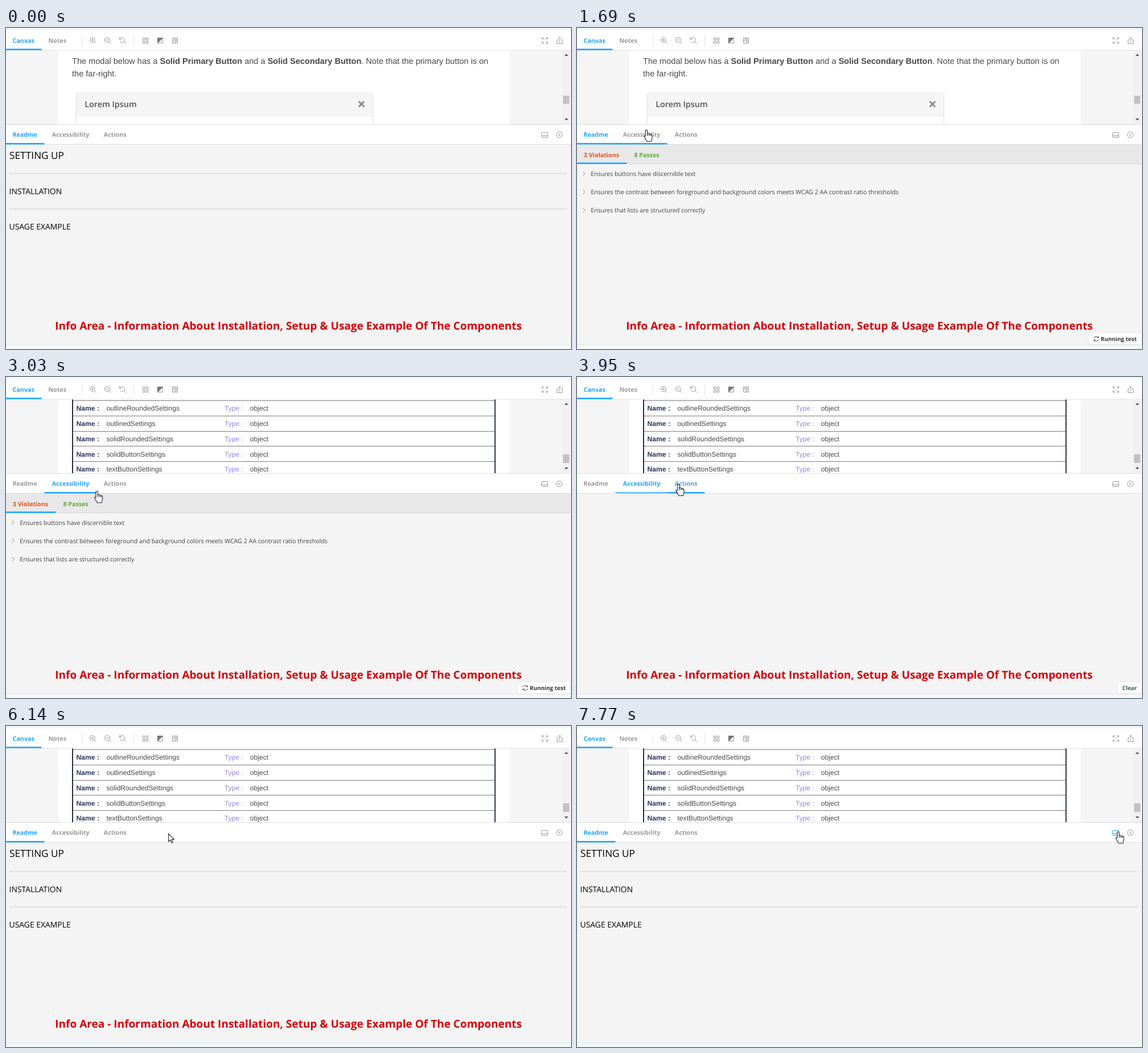
Recreate the animation shown at these times as an HTML page. Size 993x564 px, loop 8 s.

```html
<!DOCTYPE html>
<html lang="en">
<head>
<meta charset="utf-8">
<title>Component info area</title>
<style>
  html, body { margin: 0; width: 100%; height: 100%; overflow: hidden; background: #f6f9fc; }
  svg { display: block; width: 993px; height: 564px; }
  text { font-family: "Open Sans", "Noto Sans", sans-serif; text-rendering: geometricPrecision; }

  .tab { font-size: 10.7px; font-weight: 700; fill: #999; }
  .on { fill: #1ea7fd; }
  .icon { fill: none; stroke: #969696; }
  .action { font-size: 9.95px; font-weight: 700; fill: #333; }
  .doc text { font-family: "Liberation Sans", Arial, sans-serif; fill: #484848; }
  .prose { font-size: 14.56px; }
  .prose tspan { font-weight: 700; }
  .rows text { font-size: 12.1px; }
  .rows .name { font-weight: 700; fill: #2b3560; }
  .rows .type { fill: #9385df; }
  .rule { fill: #e5e5e5; }
  .head { font-size: 13.9px; font-weight: 500; fill: #000; }
  .check { font-size: 10.56px; fill: #404040; }
  .caption { font-size: 19.04px; font-weight: 700; fill: #d30408; }

  /* one 8 s clock for everything */
  .anim { animation: 8s linear infinite; }
  .cut { animation: 8s step-end infinite; }

  .readme { animation-name: readme; }
  .audit { animation-name: audit; }
  .log { animation-name: log; }
  .before { animation-name: before; }
  .after { animation-name: after; }
  .caption { animation-name: caption; }
  @keyframes readme { 0% { opacity: 1 } 19% { opacity: 0 } 68%, 100% { opacity: 1 } }
  @keyframes audit { 0% { opacity: 0 } 19% { opacity: 1 } 48.375%, 100% { opacity: 0 } }
  @keyframes log { 0% { opacity: 0 } 48.375% { opacity: 1 } 68%, 100% { opacity: 0 } }
  @keyframes before { 0% { opacity: 1 } 22.875%, 100% { opacity: 0 } }
  @keyframes after { 0% { opacity: 0 } 22.875%, 100% { opacity: 1 } }
  @keyframes caption { 0% { opacity: 1 } 89.375%, 100% { opacity: 0 } }

  .t1 { animation-name: t1; }
  .t2 { animation-name: t2; }
  .t3 { animation-name: t3; }
  @keyframes t1 { 0%, 31.875% { fill: #1ea7fd } 33.75%, 68% { fill: #999 } 70%, 100% { fill: #1ea7fd } }
  @keyframes t2 { 0%, 31.875% { fill: #999 } 33.75%, 49.5% { fill: #1ea7fd } 51.5%, 100% { fill: #999 } }
  @keyframes t3 { 0%, 48.375% { fill: #999 } 50.375%, 68% { fill: #1ea7fd } 70%, 100% { fill: #999 } }

  .u1 { animation-name: u1; }
  .u2 { animation-name: u2; }
  .u3 { animation-name: u3; }
  @keyframes u1 { 0%, 31.875% { opacity: 1 } 33.75%, 65.8% { opacity: 0 } 65.9%, 68% { opacity: .2 } 69%, 100% { opacity: 1 } }
  @keyframes u2 { 0%, 19% { opacity: 0 } 20%, 48.375% { opacity: 1 } 49.375% { opacity: .7 } 51.5%, 100% { opacity: 0 } }
  @keyframes u3 { 0%, 48.375% { opacity: 0 } 49.3%, 68% { opacity: 1 } 70%, 100% { opacity: 0 } }

  .dock { animation-name: dock; }
  @keyframes dock { 0% { stroke: #969696 } 94.2%, 100% { stroke: #1ea7fd } }

  .cursor { animation-name: move; }
  .shown { animation-name: shown; }
  .arrow { animation-name: arrow; }
  .hand { animation-name: hand; }
  .cursor path { fill: #fff; stroke: #17172a; stroke-width: 1.1; stroke-linejoin: round; }
  .spot { fill: #ffe23a; mix-blend-mode: multiply; animation-name: spot; }
  @keyframes shown { 0% { opacity: 0 } 1.625%, 100% { opacity: 1 } }
  @keyframes arrow {
    0% { opacity: 1 } 8.4% { opacity: 0 } 28% { opacity: 1 } 37.5% { opacity: 0 }
    75.9% { opacity: 1 } 94.2%, 100% { opacity: 0 }
  }
  @keyframes hand {
    0% { opacity: 0 } 8.4% { opacity: 1 } 28% { opacity: 0 } 37.5% { opacity: 1 }
    75.9% { opacity: 0 } 94.2%, 100% { opacity: 1 }
  }
  @keyframes spot {
    0% { opacity: 0; transform: translate(100.5px, 175.5px) }
    16.1% { opacity: 1; transform: translate(100.5px, 175.5px) }
    18% { opacity: 0; transform: translate(178px, 188px) }
    46.35% { opacity: 1; transform: translate(178px, 188px) }
    48.375% { opacity: 0; transform: translate(58px, 185px) }
    65.9% { opacity: 1; transform: translate(58px, 185px) }
    68%, 100% { opacity: 0; transform: translate(58px, 185px) }
  }
  @keyframes move {
    0%, 1.625% { transform: translate(744px, 536px); animation-timing-function: steps(3) }
    4.5625% { transform: translate(440px, 392px); animation-timing-function: steps(3) }
    7.5% { transform: translate(122px, 236px); animation-timing-function: steps(2) }
    9.4375% { transform: translate(72px, 190px); animation-timing-function: step-end }
    10.375% { transform: translate(99px, 172px); animation-timing-function: step-end }
    12.25% { transform: translate(104px, 173px); animation-timing-function: step-end }
    13.2% { transform: translate(101px, 176px); animation-timing-function: step-end }
    19% { transform: translate(101px, 176px); animation-timing-function: steps(8) }
    26.75% { transform: translate(185px, 187px); animation-timing-function: step-end }
    28% { transform: translate(155px, 209px); animation-timing-function: steps(2) }
    30% { transform: translate(127px, 222px); animation-timing-function: step-end }
    30.9% { transform: translate(127px, 222px); animation-timing-function: steps(11) }
    41.5% { transform: translate(178px, 188px); animation-timing-function: step-end }
    53.375% { transform: translate(178px, 188px); animation-timing-function: steps(5) }
    58.125% { transform: translate(114px, 187px); animation-timing-function: step-end }
    59.125% { transform: translate(114px, 187px); animation-timing-function: steps(3) }
    62% { transform: translate(59px, 185px); animation-timing-function: step-end }
    64.125% { transform: translate(58px, 184.5px); animation-timing-function: step-end }
    73.75% { transform: translate(58px, 184.5px); animation-timing-function: steps(11) }
    84.625% { transform: translate(891px, 200px); animation-timing-function: steps(4) }
    88.3% { transform: translate(963px, 187px); animation-timing-function: step-end }
    90.5% { transform: translate(963px, 187px); animation-timing-function: steps(7) }
    97%, 100% { transform: translate(951px, 185.5px) }
  }
</style>
</head>
<body>
<svg viewBox="0 0 993 564">
  <defs>
    <clipPath id="view"><rect y="39" width="992" height="130"/></clipPath>
    <filter id="soft" x="-5%" y="-20%" width="110%" height="140%">
      <feDropShadow dx="0" dy="1" stdDeviation="1.8" flood-opacity=".26"/>
    </filter>
    <filter id="edge" x="-1%" y="-1%" width="102%" height="102%">
      <feDropShadow dx="0" dy="1" stdDeviation="1.5" flood-opacity=".09"/>
    </filter>
  </defs>

  <rect x="-6" y="4" width="998.5" height="552" rx="4" fill="#fff" filter="url(#edge)"/>

  <!-- top bar -->
  <text class="tab on" x="11.6" y="25.8">Canvas</text>
  <text class="tab" x="74.4" y="25.8">Notes</text>
  <path d="M133.5 12V32M224.5 12V32" stroke="#e4e4e4"/>
  <g class="icon">
    <circle cx="151.8" cy="21" r="4.4"/><path d="M155 24.2L158.5 27.7M149.3 21H154.3M151.8 18.5V23.5"/>
    <circle cx="177.8" cy="21" r="4.4"/><path d="M181 24.2L184.5 27.7M175.3 21H180.3"/>
    <path d="M200.2 19.2A4.4 4.4 0 1 1 200.6 23.6M199.5 16.2V19.8H203.1M207.2 24.2L210.7 27.7"/>
    <path d="M240.5 17.5h3.6v3.6h-3.6zM246.3 17.5h3.6v3.6h-3.6zM240.5 23.3h3.6v3.6h-3.6zM246.3 23.3h3.6v3.6h-3.6z"/>
    <path d="M266.5 17.5h9v9h-9z"/><path d="M266.5 17.5h9l-9 9z" fill="#777" stroke="#777"/>
    <path d="M292.5 22V17.5H301.5V26.5H298M292.5 21.5h5v5h-5zM294.5 19.5H299.5V24.5"/>
    <path d="M942 20V17h3M949 17h3v3M952 24v3h-3M945 27h-3v-3M942 17l3.7 3.7M952 17l-3.7 3.7M952 27l-3.7-3.7M942 27l3.7-3.7"/>
    <path d="M970.5 20.5H968.5V27.5H977.5V20.5H975.5M973 25V16.5M970.5 18.8L973 16.3L975.5 18.8"/>
  </g>

  <!-- preview -->
  <g class="doc" clip-path="url(#view)">
    <rect y="39" width="992" height="130" fill="#f5f5f5"/>
    <rect x="92" y="39" width="793" height="130" fill="#fff"/>
    <rect x="977" y="39" width="15" height="130" fill="#f1f1f1"/>
    <path d="M981.5 49h6.6l-3.3-3.6zM981.5 159h6.6l-3.3 3.6z" fill="#505050"/>
    <g class="cut before">
      <text class="prose" x="116" y="63.3">The modal below has a <tspan>Solid Primary Button</tspan> and a <tspan>Solid Secondary Button</tspan>. Note that the primary button is on</text>
      <text class="prose" x="116" y="85.2">the far-right.</text>
      <rect x="124" y="113" width="520" height="80" rx="3" fill="#fff" filter="url(#soft)"/>
      <path d="M124 156V116q0-3 3-3H641q3 0 3 3V156z" fill="#f5f5f5"/>
      <text x="138.2" y="139.4" style="font:600 14.4px 'Open Sans','Noto Sans',sans-serif;fill:#555">Lorem Ipsum</text>
      <path d="M620 129l9.6 9.6M629.6 129l-9.6 9.6" stroke="#8a8a8a" stroke-width="2.8"/>
      <rect x="979" y="119" width="11" height="14" fill="#c1c1c1"/>
    </g>
    <g class="cut after">
      <g class="rows" id="rows"></g>
      <path d="M117 39V169M859.5 39V169" stroke="#252c49" stroke-width="2"/>
      <rect x="979" y="136" width="11" height="15" fill="#c1c1c1"/>
    </g>
  </g>
  <rect y="38.5" width="992" height="1" fill="#e2e2e2"/>
  <rect y="36.4" width="62.5" height="2.6" class="on"/>

  <!-- addon panel -->
  <path d="M0 204H992.5V552q0 4-4 4H0z" fill="#f4f4f4"/>
  <rect y="169" width="992" height="1" fill="#dedede"/>
  <rect y="204" width="992" height="1" fill="#dedede"/>
  <text class="tab anim t1" x="11.4" y="191.4">Readme</text>
  <text class="tab anim t2" x="80.8" y="191.4">Accessibility</text>
  <text class="tab anim t3" x="171.8" y="191.4">Actions</text>
  <rect class="on anim u1" y="202" width="67.5" height="2.6"/>
  <rect class="on anim u2" x="67.5" y="202" width="91" height="2.6"/>
  <rect class="on anim u3" x="158.5" y="202" width="66" height="2.6"/>
  <g class="icon">
    <path class="cut dock" d="M942.5 183.5h8.5q1 0 1 1v7q0 1-1 1h-8.5q-1 0-1-1v-7q0-1 1-1zM941.5 189.5H952"/>
    <circle cx="972.6" cy="187.6" r="5.1"/><path d="M970.5 185.5l4.2 4.2M974.7 185.5l-4.2 4.2"/>
  </g>

  <g class="cut readme">
    <text class="head" x="6" y="230" style="font-size:17.2px">SETTING UP</text>
    <rect class="rule" x="6" y="254" width="979.5" height="3.2"/>
    <text class="head" x="5.6" y="292">INSTALLATION</text>
    <rect class="rule" x="6" y="316.4" width="979.5" height="3.2"/>
    <text class="head" x="5.6" y="354.4">USAGE EXAMPLE</text>
  </g>

  <g class="cut audit">
    <rect y="205" width="992" height="34" fill="#e8e8e8"/>
    <rect y="238.3" width="992" height="1" fill="#d8d8d8"/>
    <rect class="on" y="236.4" width="87.5" height="2.6"/>
    <text class="tab" x="11.8" y="226.8" style="fill:#e8531f">3 Violations</text>
    <text class="tab" x="100.4" y="226.8" style="fill:#63ad3c">8 Passes</text>
    <path d="M10 252l4.3 4-4.3 4M10 284l4.3 4-4.3 4M10 316l4.3 4-4.3 4" fill="none" stroke="#999"/>
    <text class="check" x="24.3" y="259.8">Ensures buttons have discernible text</text>
    <text class="check" x="24.3" y="291.8" style="font-size:10.68px">Ensures the contrast between foreground and background colors meets WCAG 2 AA contrast ratio thresholds</text>
    <text class="check" x="24.3" y="323.8">Ensures that lists are structured correctly</text>
    <path d="M898.5 556V539q0-4 4-4H992V556z" fill="#fff" stroke="#e4e4e4"/>
    <path d="M908.7 545a4 4 0 0 1 7.4-1M916.5 547.4a4 4 0 0 1-7.4 1M916.6 541.6v2.8h-2.8M908.6 550.8V548h2.8" fill="none" stroke="#444"/>
    <text class="action" x="920.4" y="550">Running test</text>
  </g>

  <g class="cut log">
    <path d="M949.5 556V539q0-4 4-4H992V556z" fill="#fff" stroke="#e4e4e4"/>
    <text class="action" x="958.3" y="550" style="fill:#2c604c">Clear</text>
  </g>

  <text class="caption cut" x="86.3" y="530">Info Area - Information About Installation, Setup &amp; Usage Example Of The Components</text>

  <circle class="spot cut" r="10.3"/>
  <g class="cut shown">
    <g class="cursor anim">
      <path class="arrow cut" d="M.5 .5V14.5L3.8 11.4L6 16.6L8.3 15.6L6.1 10.6H10.4Z"/>
      <path class="hand cut" d="M-1.6 2C-1.6 -.2 1.8 -.2 1.8 2V7.2C2.4 6 4.8 6.3 5 7.8C5.6 6.8 7.6 7.1 7.8 8.6C8.6 7.8 10 8.4 10 9.8V14C10 17 8.6 17.6 8.4 20.5H.6C.4 18.2 -2 16 -3.8 12.6C-4.6 11 -2.8 10 -1.6 11.6ZM1.8 7.2V11M5 7.8V11M7.8 8.6V11"/>
    </g>
  </g>
</svg>
<script>
  const settings = ["outlineRounded", "outlined", "solidRounded", "solidButton", "textButton"];
  document.getElementById("rows").innerHTML = settings.map((name, i) => {
    const y = 59.2 + i * 26.8;
    const line = Math.round(41 + i * 26.8) + .5;
    return `<path d="M117 ${line}H860" stroke="#7c7c7c"/>
      <text class="name" x="123.6" y="${y}">Name :</text>
      <text x="176.5" y="${y}">${name}Settings</text>
      <text class="type" x="384" y="${y}">Type :</text>
      <text x="428.8" y="${y}">object</text>`;
  }).join("");
</script>
</body>
</html>
```
